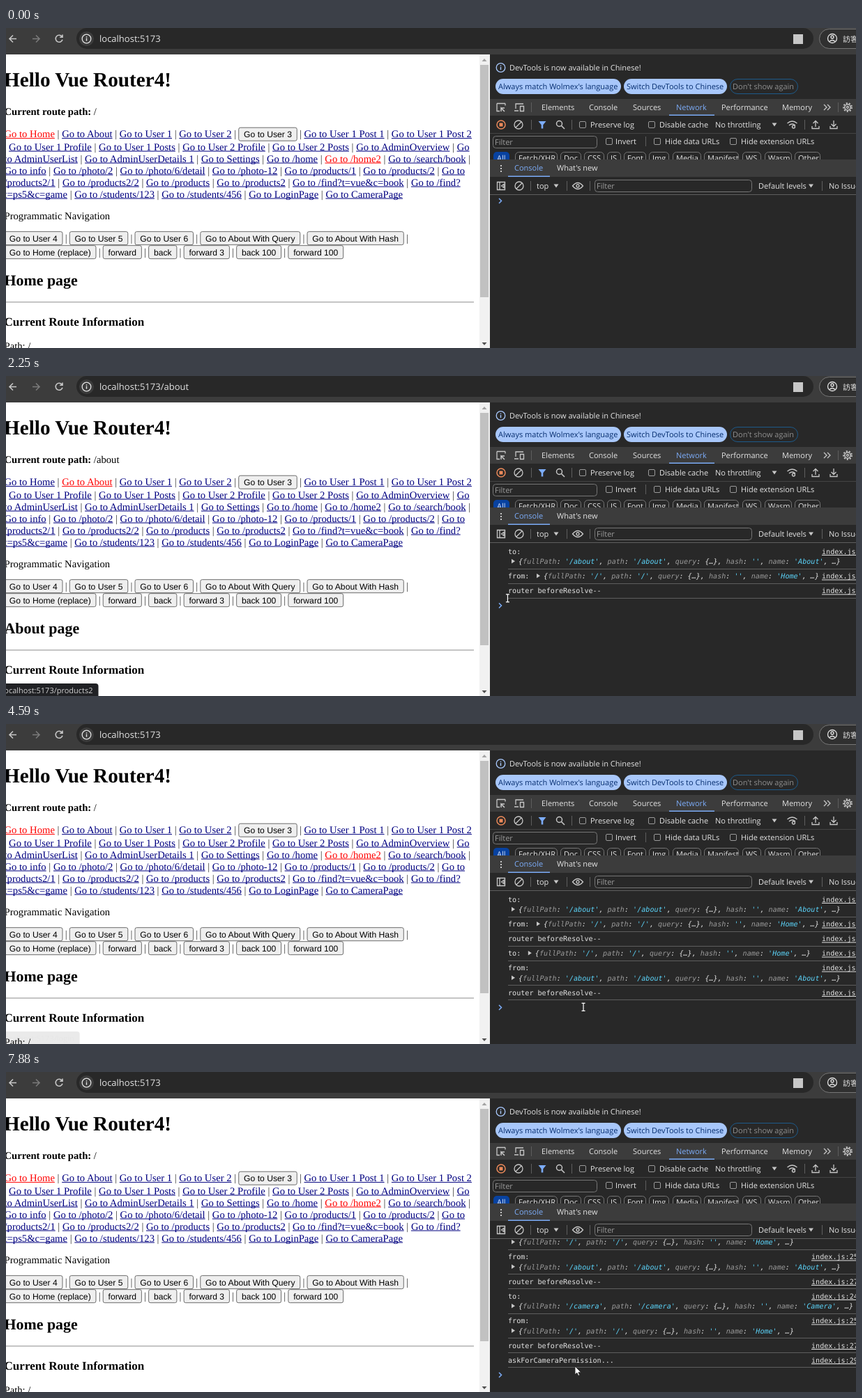
An HTML page with a canvas that plays this animation: 1219x460 px, repeating every 8000 ms.

```html
<!DOCTYPE html>
<html lang="en">
<head>
<meta charset="utf-8">
<title>Router demo</title>
<style>
html, body { margin: 0; width: 1219px; height: 460px; overflow: hidden; background: #282828; }
canvas { display: block; }
</style>
</head>
<body>
<canvas id="stage" width="1219" height="460"></canvas>
<script>
const ctx = document.getElementById('stage').getContext('2d');
const LOOP = 8000, LEFT = -2.5;
const ui = size => `${size}px "Open Sans", "Noto Sans", sans-serif`;
const serif = (size, bold = '') => `${bold} ${size}px "Liberation Serif", serif`;
const BODY = serif(14.65), BUTTON = '12.17px "Liberation Sans", sans-serif';
const MONO = '10.1px "DejaVu Sans Mono", monospace', CHAR = 6.08;
const LIGHT = '#e3e3e3', BLUE = '#7cacf8', ICON = '#c7c7c7', LINE = '#5e5e5e';

const linkRows = [
  [157, 'Go to Home|Go to About|Go to User 1|Go to User 2|[Go to User 3|Go to User 1 Post 1|Go to User 1 Post 2'],
  [175.5, '|Go to User 1 Profile|Go to User 1 Posts|Go to User 2 Profile|Go to User 2 Posts|Go to AdminOverview|Go'],
  [192.5, 'to AdminUserList|Go to AdminUserDetails 1|Go to Settings|Go to /home|Go to /home2|Go to /search/book|'],
  [209.5, 'Go to info|Go to /photo/2|Go to /photo/6/detail|Go to /photo-12|Go to /products/1|Go to /products/2|Go to'],
  [226.5, '/products2/1|Go to /products2/2|Go to /products|Go to /products2|Go to /find?t=vue&c=book|Go to /find?'],
  [243.5, 't=ps5&c=game|Go to /students/123|Go to /students/456|Go to LoginPage|Go to CameraPage'],
  [306.5, '[Go to User 4|[Go to User 5|[Go to User 6|[Go to About With Query|[Go to About With Hash|'],
  [326.5, '[Go to Home (replace)|[forward|[back|[forward 3|[back 100|[forward 100']
];

// label, line number, route path, route name
const resolved = ['router beforeResolve--', 27];
const logs = [
  ['to:', 24, '/about', 'About'], ['from:', 25, '/', 'Home'], resolved,
  ['to:', 24, '/', 'Home'], ['from:', 25, '/about', 'About'], resolved,
  ['to:', 24, '/camera', 'Camera'], ['from:', 25, '/', 'Home'], resolved,
  ['askForCameraPermission...', 29]
];

// pointer legs: start, end, target x, target y
const legs = [
  [130, 890, 118, 148], [1900, 2250, 719, 319], [2250, 2660, 806, 398],
  [2720, 3400, 48, 157], [4030, 4590, 828, 407], [4590, 4800, 834, 404],
  [5130, 5600, 632, 228], [5600, 5900, 603, 247], [5970, 6600, 548, 239],
  [7200, 7680, 816, 423]
];
const clicks = [[1370, 1570], [3560, 3690], [6810, 6870]];
const bubbles = [
  [1030, 2000, '/about'], [2100, 2500, '/products2'], [3440, 4120, ''],
  [4230, 4605, '/login'], [6200, 7450, '/camera']
];

function text(s, x, y, color, font = ui(11)) {
  ctx.font = font;
  ctx.fillStyle = color;
  ctx.fillText(s, x, y);
  return x + ctx.measureText(s).width;
}
function rect(x, y, w, h, color) {
  ctx.fillStyle = color;
  ctx.fillRect(x, y, w, h);
}
function box(x, y, w, h, r, fill, stroke) {
  ctx.beginPath();
  ctx.roundRect(x, y, w, h, r);
  if (fill) { ctx.fillStyle = fill; ctx.fill(); }
  if (stroke) { ctx.strokeStyle = stroke; ctx.lineWidth = 1; ctx.stroke(); }
}
function ring(x, y, r, color, width = 1.3) {
  ctx.beginPath();
  ctx.arc(x, y, r, 0, 7);
  ctx.strokeStyle = color;
  ctx.lineWidth = width;
  ctx.stroke();
}
function stroke(d, color = ICON, width = 1.3) {
  ctx.strokeStyle = color;
  ctx.lineWidth = width;
  ctx.stroke(new Path2D(d));
}
function fill(d, color = ICON) {
  ctx.fillStyle = color;
  ctx.fill(new Path2D(d));
}
function clipped(x, y, w, h, draw) {
  ctx.save();
  ctx.beginPath();
  ctx.rect(x, y, w, h);
  ctx.clip();
  draw();
  ctx.restore();
}
const dropArrow = (x, y) => fill(`M${x - 3.5} ${y - 2.5}h7l-3.5 5z`);
const info = (x, y, color) => {
  ring(x, y, 6.3, color);
  rect(x - .7, y - 1, 1.4, 4.2, color);
  rect(x - .7, y - 3.4, 1.4, 1.4, color);
};
const noEntry = (x, y) => {
  ring(x, y, 6, ICON);
  stroke(`M${x - 4} ${y + 4}l8 -8`);
};
const check = (x, y, label) => {
  box(x + .5, y - 4.5, 9, 9, 1.5, null, '#9a9a9a');
  text(label, x + 16, y + 4, LIGHT);
};

function drawAddressBar(path) {
  rect(0, 0, 1219, 38, '#3c3c3c');
  box(101, 0, 1057, 30, 15, '#282828');
  stroke('M15 15.5H5M10 10.5l-5 5 5 5', ICON, 1.6);
  stroke('M38 15.5h10M43 10.5l5 5 -5 5', '#7b7b7b', 1.6);
  stroke('M80.2 12.2a5 5 0 1 0 .8 4.6M81 9.5v3.8h-3.8', ICON, 1.6);
  box(105, 5, 21, 21, 10.5, '#3c3c3c');
  info(115.5, 15.5, LIGHT);
  text('localhost:5173' + path, 134, 20, LIGHT, ui(13));
  rect(1129, 9, 14, 14, ICON);
  box(1166.5, 1.5, 80, 28, 14, '#303030', '#777');
  ring(1185, 15, 6.5, LIGHT);
  ring(1185, 13, 2, LIGHT);
  stroke('M1181 19.5q4 -4 8 0', LIGHT);
  text('訪客', 1200, 20, LIGHT, '11px "Noto Sans CJK TC", "Noto Sans CJK", sans-serif');
}

function drawLinks(y, row, active) {
  let x = LEFT;
  row.split('|').forEach((item, i) => {
    if (i) x = text('|', x + (x > LEFT ? 3.66 : 0), y, '#333', BODY) + 3.66;
    if (item[0] === '[') {
      const label = item.slice(1);
      ctx.font = BUTTON;
      const w = ctx.measureText(label).width + 14.6;
      box(x, y - 13.8, w, 19, 2.5, '#efefef', '#6b6b6b');
      text(label, x + 7.3, y, '#000', BUTTON);
      x += w;
    } else if (item) {
      const color = active.includes(item) ? '#f00' : '#000080';
      const end = text(item, x, y, color, BODY);
      rect(x, y + 1.1, end - x, 1, color);
      x = end;
    }
  });
}

function drawPage(about) {
  const path = about ? '/about' : '/';
  rect(0, 38, 679, 422, '#fff');
  text('Hello Vue Router4!', LEFT - .5, 84, '#000', serif(29.2, 'bold'));
  const x = text('Current route path:', LEFT, 125, '#000', serif(14.65, 'bold'));
  text(path, x + 3.66, 125, '#000', BODY);
  const active = about ? ['Go to About'] : ['Go to Home', 'Go to /home2'];
  for (const [y, row] of linkRows) drawLinks(y, row, active);
  text('Programmatic Navigation', LEFT, 275, '#000', BODY);
  text(about ? 'About page' : 'Home page', LEFT, 370, '#000', serif(21.9, 'bold'));
  rect(0, 393.5, 671, 1, '#8c8c8c');
  text('Current Route Information', LEFT, 428, '#000', serif(17.08, 'bold'));
  text('Path: ' + path, LEFT, 462, '#000', BODY);
  rect(679, 38, 15, 422, '#f1f1f1');
  rect(680, 53, 12, 334, '#c1c1c1');
  fill('M682.5 48h7l-3.5 -4z', '#a3a3a3');
  fill('M682.5 452h7l-3.5 4z', '#505050');
}

function drawDevTools() {
  rect(694, 38, 525, 422, '#282828');
  info(709.5, 57, '#a8c7fa');
  text('DevTools is now available in Chinese!', 722, 61, LIGHT);
  box(702, 73, 180, 22, 11, '#a8c7fa');
  box(886, 73, 148, 22, 11, '#a8c7fa');
  box(1038.5, 73.5, 97, 21, 10.5, null, '#1d5a8a');
  text("Always match Wolmex's language", 706, 88, '#062e6f');
  text('Switch DevTools to Chinese', 890, 88, '#062e6f');
  text("Don't show again", 1042, 88, '#8f8f8f');

  rect(694, 102, 525, 24, '#3c3c3c');
  stroke('M704 108.5h12M704 108.5v11h4M716 108.5v3', ICON, 1.3);
  stroke('M715 120l-5 -5v5M710 115h5', ICON, 1.5);
  stroke('M731 116v-7h11M729 119h6M737.5 112.5h5v7h-5z');
  for (const [label, x] of [['Elements', 768], ['Console', 836], ['Sources', 899], ['Network', 961],
    ['Performance', 1026], ['Memory', 1113]]) text(label, x, 118, label === 'Network' ? BLUE : LIGHT);
  rect(951, 124.5, 65, 1.5, BLUE);
  stroke('M1173 110l4 4 -4 4M1178 110l4 4 -4 4');
  ring(1207, 114, 4.2, ICON, 1.5);
  ring(1207, 114, 1.5, ICON);
  ctx.setLineDash([2.1, 2.1]);
  ring(1207, 114, 6, ICON, 1.8);
  ctx.setLineDash([]);

  ring(710, 139, 6, '#ec8a5a', 1.5);
  rect(707.5, 136.5, 5, 5, '#ec8a5a');
  noEntry(735, 139);
  fill('M763.5 134h11l-4.2 5.3v5.2h-2.6v-5.2z', BLUE);
  ring(793.5, 137.5, 4, ICON, 1.5);
  stroke('M796.5 140.5l4.5 4.5', ICON, 1.6);
  check(822, 139, 'Preserve log');
  check(921, 139, 'Disable cache');
  text('No throttling', 1017, 143, LIGHT);
  dropArrow(1102, 139);
  stroke('M1120.5 137q7 -6 14 0M1123 140q4.5 -4 9 0');
  ring(1129.5, 142, 2, ICON);
  stroke('M1161 142v-8M1157.5 137l3.5 -3.5 3.5 3.5M1156 141v3.5h10v-3.5');
  stroke('M1187 133v8M1183.5 138l3.5 3.5 3.5 -3.5M1182 141v3.5h10v-3.5');
  rect(694, 151, 525, 1, '#444');

  box(698.5, 155.5, 149, 17, 4, null, '#757575');
  text('Filter', 701, 168, '#9a9a9a');
  check(860, 163, '');
  text('Invert', 874, 167, LIGHT);
  check(929, 163, 'Hide data URLs');
  check(1038, 163, 'Hide extension URLs');
  clipped(694, 174, 525, 15, () => {
    box(699, 178, 23, 18, 5, '#0842a0');
    text('All', 704, 191, '#d3e3fd');
    for (const [label, x, w] of [['Fetch/XHR', 730, 61], ['Doc', 795, 30], ['CSS', 829, 29], ['JS', 862, 20],
      ['Font', 886, 32], ['Img', 922, 29], ['Media', 956, 41], ['Manifest', 1001, 50], ['WS', 1056, 27],
      ['Wasm', 1088, 39], ['Other', 1131, 37]]) {
      box(x + .5, 178.5, w - 1, 18, 5, null, '#757575');
      text(label, x + 5, 191, LIGHT);
    }
  });

  rect(694, 189, 525, 25, '#3c3c3c');
  for (const y of [197, 201, 205]) rect(709, y, 2, 2, ICON);
  text('Console', 729, 205, BLUE);
  text("What's new", 790, 205, LIGHT);
  rect(720, 212.5, 60, 1.5, BLUE);
  stroke('M704.5 221.5h11v11h-11zM708 221.5v11M714 224.5l-3.5 2.5 3.5 2.5z');
  noEntry(736, 227);
  text('top', 761, 231, LIGHT);
  dropArrow(789, 227);
  stroke('M812.5 227q7.5 -9 15 0q-7.5 9 -15 0z');
  ring(820, 227, 2, ICON);
  box(844.5, 218.5, 225, 17, 4, null, '#757575');
  text('Filter', 847, 231, '#9a9a9a');
  text('Default levels', 1079, 231, LIGHT);
  dropArrow(1154.5, 227);
  text('No Issues', 1180, 231, LIGHT);
  rect(694, 239, 525, 1, LINE);
  for (const [x, y] of [[753, 114], [1193, 114], [753, 139], [811, 139], [1145, 139], [917, 163],
    [752, 227], [804, 227], [837, 227], [1170, 227]]) rect(x, y - 7, 1, 14, LINE);
}

const preview = (path, name) =>
  `{fullPath: '${path}', path: '${path}', query: {…}, hash: '', name: '${name}', …}`;

function drawObject(x, y, object) {
  fill(`M${x - 10} ${y - 7}v6.6l5 -3.3z`);
  for (const part of object.match(/'[^']*'|\w+|[^\w']+/g)) {
    const color = part[0] === "'" ? '#5cd5fb' : /\w/.test(part) ? '#9a9a9a' : LIGHT;
    x = text(part, x, y, color, 'italic ' + MONO);
  }
}

function drawConsole(count) {
  const linkX = count > 6 ? 1155 : 1170;
  const rows = logs.slice(0, count).map(([label, line, path, name]) => {
    const object = path && preview(path, name);
    const inlineX = 720 + label.length * CHAR + 20.6;
    const wraps = object && inlineX + object.length * CHAR + 3 > linkX;
    return { label, line, object, wraps, inlineX, height: wraps ? 35.5 : 21 };
  });
  const total = rows.reduce((sum, row) => sum + row.height, 0);
  let y = Math.min(242, 425 - total);
  clipped(695, 240, 524, 220, () => {
    for (const row of rows) {
      text(row.label, 720, y + 13.5, LIGHT, MONO);
      const end = text('index.js:' + row.line, linkX, y + 13.5, LIGHT, MONO);
      rect(linkX, y + 15, end - linkX, 1, LIGHT);
      if (row.object) drawObject(row.wraps ? 735 : row.inlineX, y + (row.wraps ? 28 : 13.5), row.object);
      y += row.height;
      rect(720, Math.round(y) - 1, 499, 1, LINE);
    }
    const top = count ? y + 7 : 245;
    stroke(`M707 ${top}l3.5 3.5 -3.5 3.5`, BLUE, 1.5);
  });
}

function drawBubbles(t) {
  for (const [start, end, path] of bubbles) {
    if (t < start || t > end) continue;
    ctx.globalAlpha = Math.min(1, (t - start + 20) / 80, (end - t) / 150);
    ctx.font = ui(11);
    const label = 'localhost:5173' + path;
    box(-5, 442, ctx.measureText(label).width + 7.5, 24, 4, '#202124');
    text(label, -5.5, 456, '#cfcfcf');
    ctx.globalAlpha = 1;
  }
}

function pointerAt(t) {
  let x = 975, y = 372, p = 1;
  for (const [start, end, toX, toY] of legs) {
    if (t < start) break;
    p = Math.min(1, (t - start) / (end - start));
    const k = 1 - (1 - p) ** 2;
    x += (toX - x) * k;
    y += (toY - y) * k;
  }
  return { x, y, resting: p > .8 };
}

function drawPointer(t) {
  if (t < 130) return;
  const { x, y, resting } = pointerAt(t);
  if (clicks.some(([start, end]) => t >= start && t < end)) {
    ctx.beginPath();
    ctx.arc(x, y + 2, 12, 0, 7);
    ctx.fillStyle = 'rgba(250, 230, 50, .75)';
    ctx.fill();
  }
  ctx.save();
  ctx.translate(x, y);
  if (x > 695 && t < 7200) {
    stroke('M-2.5 -5.5h5M0 -5.5v11M-2.5 5.5h5', '#fff', 1.2);
  } else {
    const hand = resting && x < 595;
    if (hand) ctx.translate(-4.8, 0);
    const d = hand
      ? 'M3.5 10V1.5a1.3 1.3 0 0 1 2.6 0V6.5l5 1a1.8 1.8 0 0 1 1.5 1.8L11.8 14V17H5V15L1 10.5Q.8 8.5 3.5 10Z'
      : 'M0 0V12L2.9 9.5L4.8 13.6L6.7 12.7L4.9 8.8H8.8Z';
    fill(d, '#fff');
    stroke(d, '#222', .9);
  }
  ctx.restore();
}

function draw(now) {
  const t = now % LOOP;
  const about = t >= 1570 && t < 3690;
  ctx.textRendering = 'geometricPrecision';
  drawAddressBar(about ? '/about' : '');
  drawPage(about);
  drawDevTools();
  drawConsole(t < 1570 ? 0 : t < 3690 ? 3 : t < 6870 ? 6 : 10);
  drawBubbles(t);
  drawPointer(t);
  requestAnimationFrame(draw);
}
requestAnimationFrame(draw);
</script>
</body>
</html>
```
